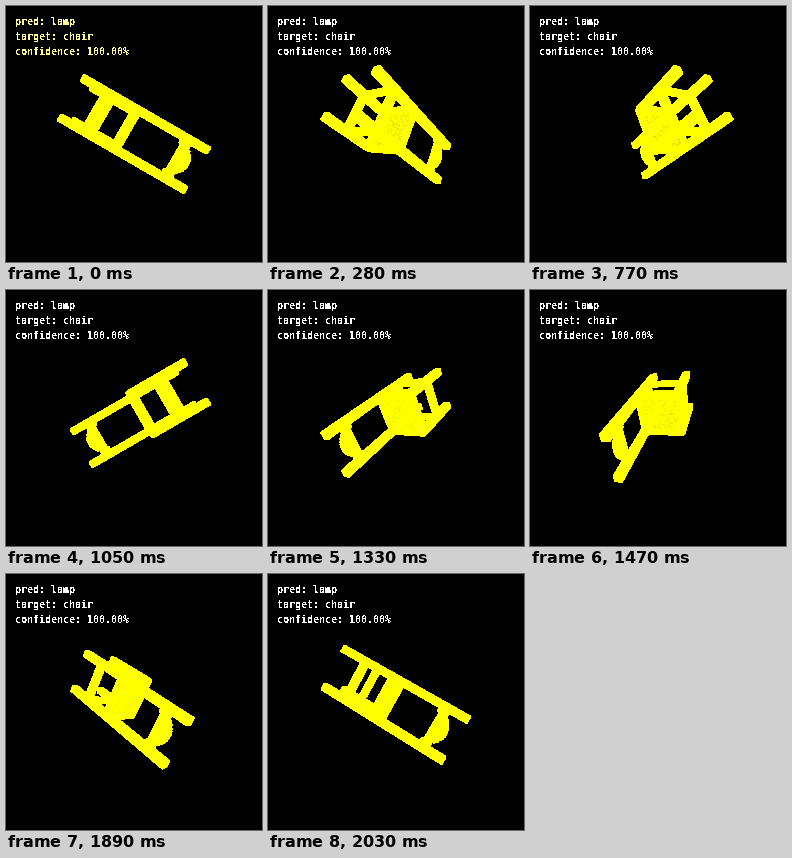
These frames come from a looping animation (256x256 px, 2100 ms). A matplotlib script:

```python
import numpy as np
import matplotlib.pyplot as plt
from matplotlib.animation import FuncAnimation
from matplotlib.collections import PolyCollection

SIZE, FRAMES, INTERVAL = 256, 30, 70
CENTER, DIST = 128, 221.7  # camera distance, in pixels at the axis
YELLOW = "#ffff00"
TILT = np.radians(30)

FACES = [(0, 1, 3, 2), (4, 5, 7, 6), (0, 1, 5, 4),
         (2, 3, 7, 6), (0, 2, 6, 4), (1, 3, 7, 5)]


def box(u, v, d):
    """Six faces of a box: u along the height, v across, d in depth."""
    corners = np.array([(a, b, c) for a in u for b in v for c in d], float)
    return corners[FACES]


def span(mid, half):
    return mid - half, mid + half


def project(points, angle):
    u, v, d = np.moveaxis(points, -1, 0)
    x = u * np.cos(TILT) - v * np.sin(TILT)
    y = u * np.sin(TILT) + v * np.cos(TILT)
    c, s = np.cos(angle), np.sin(angle)
    depth = d * c - x * s
    scale = DIST / (DIST - depth)
    return np.stack([CENTER + (x * c + d * s) * scale,
                     CENTER + y * scale], axis=-1)


V, D, POST, RUNG = 20.6, 20, 3.0, 2.9

# Front legs and the rungs below the seat
base = []
for side in (-V, V):
    base.append(box((-65.3, -8), span(side, POST), span(-D, POST)))
    base.append(box(span(-40, 2.2), span(side, 2), (-D, D)))
for depth in (-D, D):
    base.append(box(span(-40, RUNG), (-V, V), span(depth, 2.2)))

# Back posts and the bowed top rail
back = []
for side in (-1, 1):
    back.append(box((-65.3, 65.3), span(side * V, POST), span(D, POST)))
    back.append(box((40, 49), sorted((side * 14, side * V)), span(D, 2)))
edges = np.linspace(-16, 16, 15)
for lo, hi in zip(edges[:-1], edges[1:]):
    top = 42 + 14 * np.cos(np.pi * (lo + hi) / 2 / 38)
    back.append(box((42, top), (lo, hi), span(D, 2)))

base, back = np.concatenate(base), np.concatenate(back)
seat = box((-12.5, -5.5), span(0, V + 2.8), span(0, D + 2))

rng = np.random.default_rng(4)
grain = np.column_stack([np.full(220, -9.0),
                         rng.uniform(-18, 18, 220),
                         rng.uniform(-17, 17, 220)])

fig = plt.figure(figsize=(SIZE / 72, SIZE / 72), dpi=72, facecolor="black")
ax = fig.add_axes([0, 0, 1, 1])
ax.set(xlim=(0, SIZE), ylim=(SIZE, 0))
ax.axis("off")


def solid(zorder):
    shape = PolyCollection([], facecolors=YELLOW, edgecolors=YELLOW,
                           linewidths=1, antialiaseds=False,
                           joinstyle="round", zorder=zorder)
    return ax.add_collection(shape)


base_art, seat_art, back_art = solid(1), solid(2), solid(4)
specks = ax.scatter([], [], s=1, marker="s", c="#b4b400", linewidths=0, zorder=3)

lines = ["pred: lamp", "target: chair", "confidence: 100.00%"]
labels = [ax.text(9, 19 + 15 * i, line, family="DejaVu Sans Mono", size=10,
                  weight="bold", color="white", antialiased=False, zorder=9)
          for i, line in enumerate(lines)]


def update(i):
    angle = 2 * np.pi * i / FRAMES
    for art, faces in ((base_art, base), (seat_art, seat), (back_art, back)):
        art.set_verts(project(faces, angle))
    facing = np.sin(angle)
    # The underside of the seat shows in the first half turn
    base_art.set_zorder(5 if facing > 0 else 1)
    specks.set_offsets(project(grain, angle))
    specks.set_alpha(abs(facing) ** 3 * (0.9 if facing > 0 else 0.3))
    for label in labels:
        label.set_color("#ffff90" if i == 0 else "white")
    return [base_art, seat_art, specks, back_art, *labels]


anim = FuncAnimation(fig, update, frames=FRAMES, interval=INTERVAL,
                     repeat=True, repeat_delay=0)
plt.show()
```
